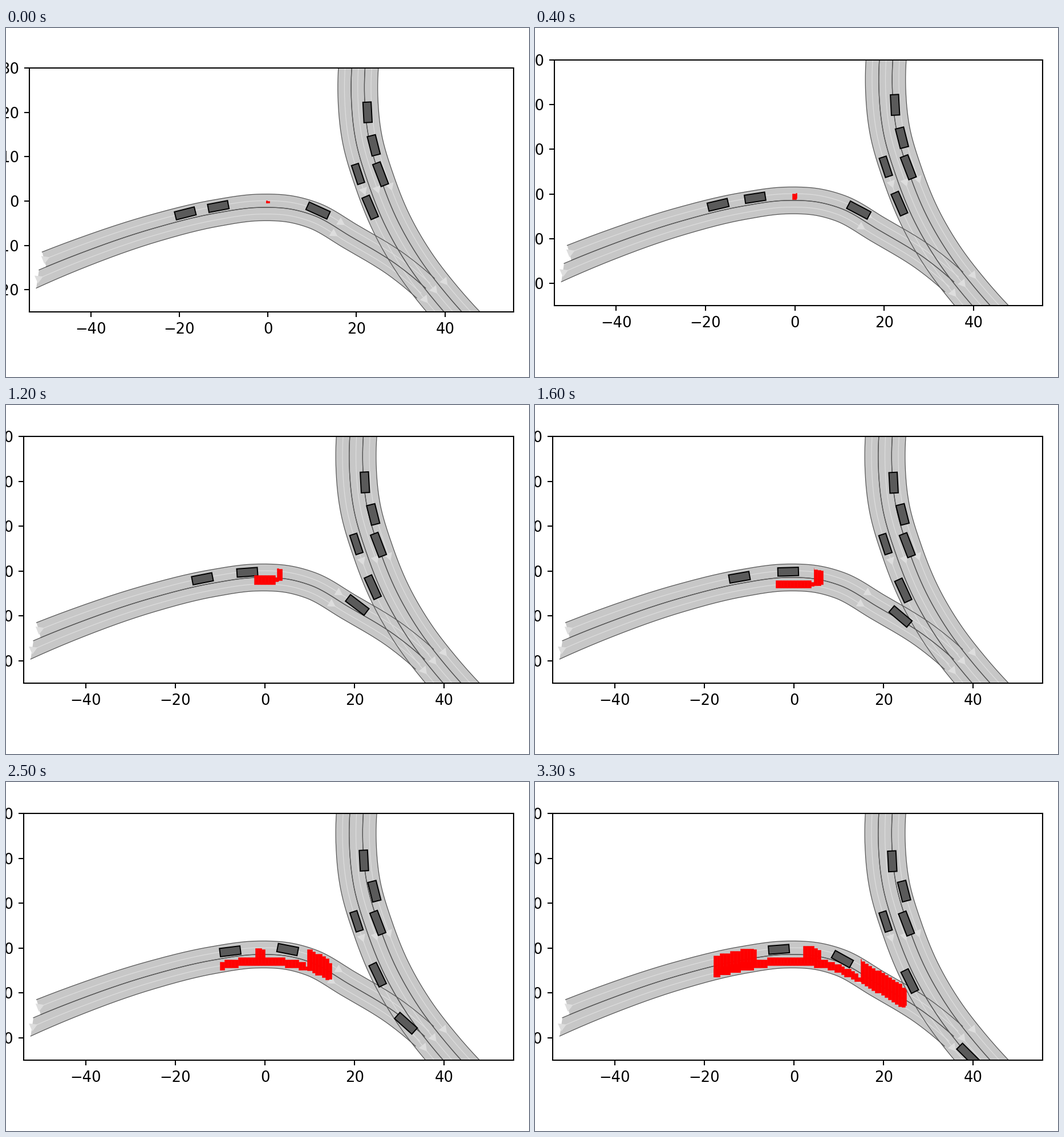
A matplotlib script that plays this animation: 917x611 px, repeating every 3400 ms.

```python
import matplotlib.pyplot as plt
import numpy as np
from matplotlib.animation import FuncAnimation
from matplotlib.collections import PolyCollection
from matplotlib.patches import Polygon

W, H, DPI = 917, 611, 128
FRAMES = 34
XLIM, YLIM = (-53.85, 55.48), (-25, 30)
PT = 72 / DPI            # points per pixel
UNIT = 186 / 72 * PT     # scale of the type and tick sizes

plt.rcParams["font.family"] = "DejaVu Sans"
fig = plt.figure(figsize=(W / DPI, H / DPI), dpi=DPI, facecolor="white")
ax = fig.add_axes([0, 0, 1, 1])
ax.set(xlim=XLIM, ylim=YLIM,
       xticks=range(-40, 41, 20), yticks=range(-20, 31, 10))
ax.tick_params(labelsize=10 * UNIT, length=3.5 * UNIT,
               pad=3.5 * UNIT, width=0.8 * UNIT)
for spine in ax.spines.values():
    spine.set_linewidth(0.8 * UNIT)


def place_axes(n):
    """The layout settles in two hard steps; the scale stays equal."""
    left = 41 if n == 0 else 34 if n < 7 else 31
    middle = 283.5 if n == 0 else 271
    width = 890 - left
    height = width * np.ptp(YLIM) / np.ptp(XLIM)
    ax.set_position([left / W, 1 - (middle + height / 2) / H,
                     width / W, height / H])


# Curves
def curve(points, per=30):
    """Smooth line through a few points, parametrised by chord length."""
    p = np.array(points, float)
    s = np.r_[0, np.cumsum(np.hypot(*np.diff(p, axis=0).T))]
    m = np.gradient(p, s, axis=0, edge_order=min(2, len(p) - 1))
    u = np.linspace(0, 1, per, endpoint=False)[:, None]
    parts = []
    for i, h in enumerate(np.diff(s)):
        parts.append((1 + 2 * u) * (1 - u) ** 2 * p[i]
                     + u * u * (3 - 2 * u) * p[i + 1]
                     + u * (1 - u) * h * ((1 - u) * m[i] - u * m[i + 1]))
    return np.vstack(parts + [p[-1:]])


def tangent(line):
    t = np.gradient(line, axis=0)
    return t / np.linalg.norm(t, axis=1)[:, None]


def offset(line, d):
    t = tangent(line)
    return line + np.column_stack([-t[:, 1] * d, t[:, 0] * d])


def heading(line):
    t = tangent(line)
    return np.unwrap(np.arctan2(t[:, 1], t[:, 0]))


# Roads
WEST = curve([(-54.5, -16.75), (-42.3, -11.76), (-25.8, -6.16),
              (-11.7, -2.72), (-1.8, -1.45), (5.6, -1.9), (10.3, -3.23),
              (18.6, -7.94), (29.4, -14.56), (35.6, -19.64)])
EAST = curve([(20.7, 33), (20.34, 23), (21.3, 14), (24, 4.7), (28, -5.2),
              (33.3, -14.3), (39.2, -22), (46.1, -29.6)])
WIDEN = 1 + 0.165 * (np.minimum(WEST[:, 0], 0) / 52) ** 2


def west(d, start=-60):
    line = offset(WEST, d * WIDEN)
    return line[line[:, 0] > start]


def draw_lane(left, center, right):
    ax.add_patch(Polygon(np.vstack([left, right[::-1]]), fc="#c7c7c7",
                         ec="none", zorder=1))
    for line in (left, right):
        ax.plot(*line.T, color="#555555", lw=1.25 * PT, zorder=1.2)
    ax.plot(*center.T, color="#dddddd", lw=1.25 * PT, zorder=1.1)


def draw_arrow(line, x, r=1.12):
    i = np.argmin(abs(line[:, 0] - x))
    a = heading(line)[i] + np.radians([0, 120, 240])
    ax.add_patch(Polygon(line[i] + r * np.column_stack([np.cos(a), np.sin(a)]),
                         fc="#dddddd", ec="none", zorder=1.3))


draw_lane(west(3, -51.3), west(1.5, -50.6), west(0, -50.4))
draw_lane(west(0, -51.9), west(-1.5, -52.2), west(-3, -52.6))
for d in (-3, 0, 3):
    draw_lane(offset(EAST, d + 1.5), offset(EAST, d), offset(EAST, d - 1.5))
    draw_arrow(offset(EAST, d), 24.7 + d)
    draw_arrow(offset(EAST, d), 37.6 + 0.75 * d)
for d in (-1.5, 1.5):
    draw_arrow(west(d), -51.1 + 0.4 * d)
    draw_arrow(west(d), 15.7 + 0.53 * d)


class Car:
    """Drives along a path; gain is how strongly it speeds up."""

    def __init__(self, length, width, points, gain=0.0, deg=None):
        self.box = np.array([(-1, -1), (1, -1), (1, 1), (-1, 1)]) \
            * (length / 2, width / 2)
        path = curve(points)
        s = np.r_[0, np.cumsum(np.hypot(*np.diff(path, axis=0).T))]
        turn = heading(path) if deg is None else np.full(len(s), np.radians(deg))
        self.s, self.gain = s / s[-1], gain
        self.track = path[:, 0], path[:, 1], turn
        self.patch = ax.add_patch(Polygon(self.box, fc="#5a5a5a", ec="black",
                                          lw=2 * PT, zorder=2))

    def move(self, t):
        u = t * (1 + self.gain * t) / (1 + self.gain)
        x, y, a = (np.interp(u, self.s, v) for v in self.track)
        c, s = np.cos(a), np.sin(a)
        self.patch.set_xy(self.box @ np.array([(c, s), (-s, c)]) + (x, y))


cars = [
    Car(4.6, 1.85, [(22.5, 20), (21.93, 19.33)], deg=-87),
    Car(4.5, 1.9, [(23.9, 12.55), (24.57, 12.68)], deg=-75.8),
    Car(5.3, 1.8, [(25.45, 6.05), (25.1, 5.45)], deg=-69),
    Car(4.5, 1.65, [(20.36, 6.1), (20.45, 5.9)], deg=-71.8),
    Car(5.25, 1.8, [(23.1, -1.43), (24.38, -4.32), (25.84, -7.37)]),
    Car(5.2, 1.85, [(11.33, -2.15), (17.25, -5.27), (27.75, -13.55),
                    (38.8, -23.7)], gain=0.33),
    Car(4.6, 1.85, [(-11.2, -1.24), (-1.08, -0.15), (4.84, -0.3),
                    (10.8, -2.47)], gain=0.2),
    Car(4.6, 1.85, [(-18.65, -2.78), (-12.2, -1.4), (-3.37, -0.3)], gain=0.3),
]

area = PolyCollection([], fc="red", ec="red", lw=0.5 * PT, zorder=2.2)
ax.add_collection(area, autolim=False)


def reachable(t):
    """Parts as x range and height range above the lane divider."""
    head = max(0.4, 25 * t ** 1.86)
    inner = 14.9 * t ** 1.6 - 0.4 * (1 - t)
    tail = -0.35 - 17.55 * t ** 2.13
    gap = 17 * t - 15
    return [
        (inner, head, max(-2, 1.05 - 4.7 * t), 1.6 + 1.4 * t),
        (tail, inner + 0.2, max(-2.4, 1.05 - 6.8 * t),
         np.clip(4 - 9.5 * t, -0.6, 1.6)),
        (gap, gap + 8 * (t - 0.5), -1, min(1.95, 10 * t - 6.15)),
        (tail, 8.3 * t - 16.7, -2.4, min(2.3, 12 * t - 9.7)),
    ]


def columns(x0, x1, low, high, step=0.75):
    """Staircase of boxes that follows the lane divider in half units."""
    if x1 - x0 < 0.05 or high <= low:
        return []
    inner = np.arange(np.ceil(x0 / step), np.ceil(x1 / step)) * step
    edges = np.unique(np.r_[x0, inner, x1])
    boxes = []
    for a, b in zip(edges[:-1], edges[1:]):
        mid = (a + b) / 2
        y = np.round(2 * np.interp(mid, *WEST.T)) / 2
        trim = min(0.8, 0.15 * (x1 - x0)) * max(0, 1 - (x1 - mid))
        lo, hi = y + low + trim, y + high - trim
        boxes.append([(a, lo), (b, lo), (b, hi), (a, hi)])
    return boxes


def update(n):
    t = n / (FRAMES - 1)
    place_axes(n)
    for car in cars:
        car.move(t)
    area.set_verts([box for part in reachable(t) for box in columns(*part)])
    return [area] + [car.patch for car in cars]


anim = FuncAnimation(fig, update, frames=FRAMES, interval=100,
                     repeat=True, repeat_delay=0, blit=False)
plt.show()
```
